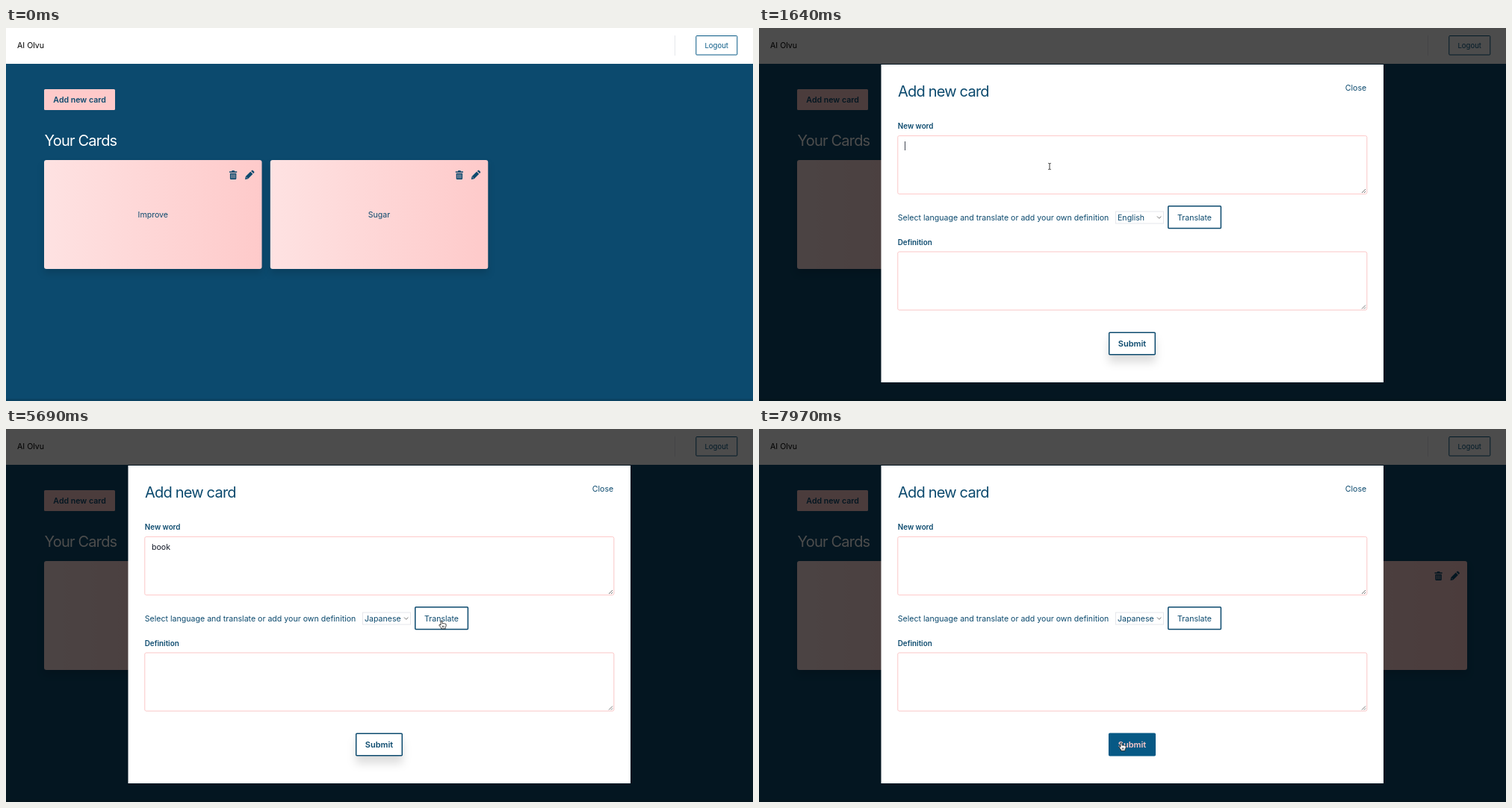
An HTML page for the animation above (8 s loop, 1000 px wide and 500 px high).

```html
<!DOCTYPE html>
<html lang="en">
<head>
<meta charset="utf-8">
<style>
  html, body { margin: 0; width: 100%; height: 100%; overflow: hidden; background: #0c4a6e; }
  svg { display: block; width: 1000px; height: 500px; }
  text { font: 10.6px Inter, "Noto Sans CJK JP", "Noto Sans CJK", sans-serif; font-optical-sizing: none; fill: #0c4a6e; white-space: pre; }
  .title { font-size: 20px; letter-spacing: -.04em; }
  .bold { font-weight: 600; }
  .label { font-weight: 600; font-size: 9.8px; }
  .mid { text-anchor: middle; }
  .dark { fill: #111827; }
  .field { fill: #fff; stroke: #fecaca; filter: drop-shadow(0 .7px .5px #0001); }
  .outline { fill: #fff; stroke: #0c4a6e; stroke-width: 1.5; }
  .line { fill: none; stroke: #555; stroke-width: .8; }
</style>
</head>
<body>
<svg viewBox="0 0 1000 500">
  <defs>
    <linearGradient id="pink"><stop stop-color="#fee2e2"/><stop offset="1" stop-color="#fecaca"/></linearGradient>
    <g id="card">
      <rect width="291.5" height="146" rx="3" fill="url(#pink)" style="filter:drop-shadow(0 6px 5px #0002)"/>
      <g fill="#0c4a6e">
        <path d="M248 15.2h3l.6-1.2h3l.6 1.2h3v1.5H248zM248.9 17.7h8.4v7q0 1.3-1.3 1.3h-5.8q-1.3 0-1.3-1.3z"/>
        <path d="M269 26l.8-3.9 6.5-6.5 3.1 3.1-6.5 6.5zM277.1 14.8l.9-.9q.8-.7 1.6 0l1.5 1.5q.7.8 0 1.6l-.9.9z"/>
      </g>
      <path d="M251 19v5.6M253.1 19v5.6M255.2 19v5.6M270.6 22.8l1.6 1.6" stroke="#fed0d0" stroke-width=".7"/>
    </g>
    <g id="area">
      <rect class="field" x="185.8" y=".5" width="628" height="78" rx="2"/>
      <path class="line" d="M807 77l5-5M810 77l2-2"/>
    </g>
  </defs>

  <rect width="1000" height="500" fill="#0c4a6e"/>
  <rect y="497" width="1000" height="3" fill="#0a4262"/>
  <rect width="1000" height="48" fill="#fff"/>
  <text x="15" y="27" style="fill:#000">AI Olvu</text>
  <path d="M895.5 10v27" stroke="#e5e7eb"/>
  <rect x="923.8" y="10.5" width="55" height="25.5" rx="1" fill="#fff" stroke="#075985"/>
  <text class="mid" x="951.2" y="26.7" style="font-size:9.6px;fill:#075985">Logout</text>

  <rect id="add" x="51" y="82" width="95" height="28" rx="1.5"/>
  <text class="bold mid" x="98.6" y="100">Add new card</text>
  <text class="title" x="51.5" y="158" style="fill:#fff">Your Cards</text>
  <use href="#card" x="51" y="177"/>
  <text class="mid" x="196.8" y="254.3">Improve</text>
  <use href="#card" x="353.8" y="177"/>
  <text class="mid" x="499.5" y="254.3">Sugar</text>
  <use id="newCard" href="#card" x="656.5" y="177"/>

  <g id="modal">
    <rect width="1000" height="500" fill="#000" opacity=".7"/>
    <rect x="163.5" y="49" width="672.5" height="426" fill="#fff"/>
    <text class="title" x="186" y="91.5">Add new card</text>
    <text x="784.8" y="84">Close</text>
    <text class="label" x="185.8" y="135">New word</text>
    <use href="#area" y="144"/>
    <text id="word" class="dark" x="195" y="161.5"></text>
    <path id="caret" d="M0 152v12" stroke="#111827" stroke-width=".8"/>
    <text x="185.8" y="257.7">Select language and translate or add your own definition</text>
    <rect x="477.5" y="246" width="64" height="16" fill="#fff" stroke="#e5e7eb"/>
    <text id="language" x="480" y="257.7"></text>
    <path class="line" d="M533 252.5l2.7 2.7 2.7-2.7"/>
    <rect class="outline" x="547.8" y="238.8" width="70.6" height="29.6" rx="1"/>
    <text class="mid" x="583" y="257.7">Translate</text>
    <text class="label" x="185.8" y="290.7">Definition</text>
    <use href="#area" y="299.5"/>
    <text id="meaning" class="dark" x="195" y="317.3"></text>
    <rect id="submit" class="outline" x="468.7" y="408.2" width="61.6" height="29.6" rx="1"/>
    <text id="submitText" class="bold mid" x="499.5" y="427" style="font-size:11px">Submit</text>
  </g>

  <g id="cursor">
    <path id="arrow" d="M0 0v8.2l1.9-1.8 1.4 3 1.5-.7-1.4-2.9h2.6z" fill="#000" stroke="#fff" stroke-width=".7"/>
    <path id="hand" d="M-1 .8q1-1.6 2 0v3q1-.9 1.8 0 1-.7 1.7.3 1.4-.5 1.6.8v2.2l-1 2v1.7H-.5v-1.3L-3 6.4q-.4-1.6 1-1.2l1 .8zM1.3 6.7v2.4M3 6.7v2.4" fill="#fff" stroke="#111" stroke-width=".8"/>
    <path id="beam" d="M-1.8-4.2q1.8 0 1.8 1v6.4q0 1-1.8 1M1.8-4.2Q0-4.2 0-3.2M0 3.2q0 1 1.8 1" fill="none" stroke="#222" stroke-width=".9"/>
  </g>
</svg>
<script>
const LOOP = 8000;
const $ = id => document.getElementById(id);
const show = (id, on) => { $(id).style.display = on ? '' : 'none'; };

// Pointer legs: start, end, number of recorded positions, target x and y
const origin = [430, 440];
const legs = [
  [120, 910, 9, 117, 95.5],
  [970, 1460, 6, 389, 185.5],
  [2840, 3610, 9, 515, 255],
  [4840, 5260, 5, 583, 257],
  [5690, 6090, 5, 545, 322],
  [6270, 6660, 5, 477, 411],
  [6660, 7060, 5, 485, 420.5],
];

function pointer(t) {
  let [x, y] = origin;
  for (const [start, end, count, toX, toY] of legs) {
    if (t < start) break;
    const steps = count - 1;
    const k = Math.min(1, Math.floor((t - start) / (end - start) * steps + .01) / steps);
    const p = k * k * (3 - 2 * k);
    x += (toX - x) * p;
    y += (toY - y) * p;
  }
  return [x, y];
}

const inside = (x, y, left, top, right, bottom) => x > left && x < right && y > top && y < bottom;

function cursorKind(t, x, y) {
  if (t < 1000) return inside(x, y, 51, 82, 146, 110) ? 'hand' : 'arrow';
  if (inside(x, y, 186, 144, 814, 223) || inside(x, y, 186, 300, 814, 378)) return 'beam';
  if (inside(x, y, 547, 238, 619, 269) || (t >= 6760 && y > 408)) return 'hand';
  return 'arrow';
}

const mix = (a, b, k) => `rgb(${a.map((v, i) => v + (b[i] - v) * k)})`;

function draw(t) {
  const [x, y] = pointer(t);
  const kind = cursorKind(t, x, y);
  const open = t >= 970, saved = t >= 7970;
  show('cursor', t >= 120);
  $('cursor').setAttribute('transform', `translate(${x} ${y})`);
  for (const id of ['arrow', 'hand', 'beam']) show(id, id === kind);

  $('add').setAttribute('fill', !open && t >= 120 && kind === 'hand' ? '#fee2e2' : '#fecaca');
  show('modal', open);
  show('newCard', saved);

  const typed = [2090, 2250, 2580, 2640].filter(at => t >= at).length;
  $('word').textContent = saved ? '' : 'book'.slice(0, typed);
  show('caret', t >= 1640 && t < 3710);
  $('caret').setAttribute('transform', `translate(${195.5 + typed * 6.35} 0)`);
  $('language').textContent = t < 4840 ? 'English' : 'Japanese';
  $('meaning').textContent = t >= 6270 && !saved ? '本 (hon)' : '';

  const hover = t < 6660 ? 0 : t < 6760 ? .28 : 1;
  const submit = $('submit').style;
  submit.fill = mix([255, 255, 255], [7, 89, 133], hover);
  submit.stroke = mix([12, 74, 110], [7, 89, 133], hover);
  submit.filter = hover < 1 ? `drop-shadow(0 10px 6px rgba(0,0,0,${.13 * (1 - hover)}))` : 'none';
  $('submitText').style.fill = mix([12, 74, 110], [254, 202, 202], hover);
}

const began = performance.now();
function tick() {
  draw((performance.now() - began) % LOOP);
  requestAnimationFrame(tick);
}
tick();
</script>
</body>
</html>
```
